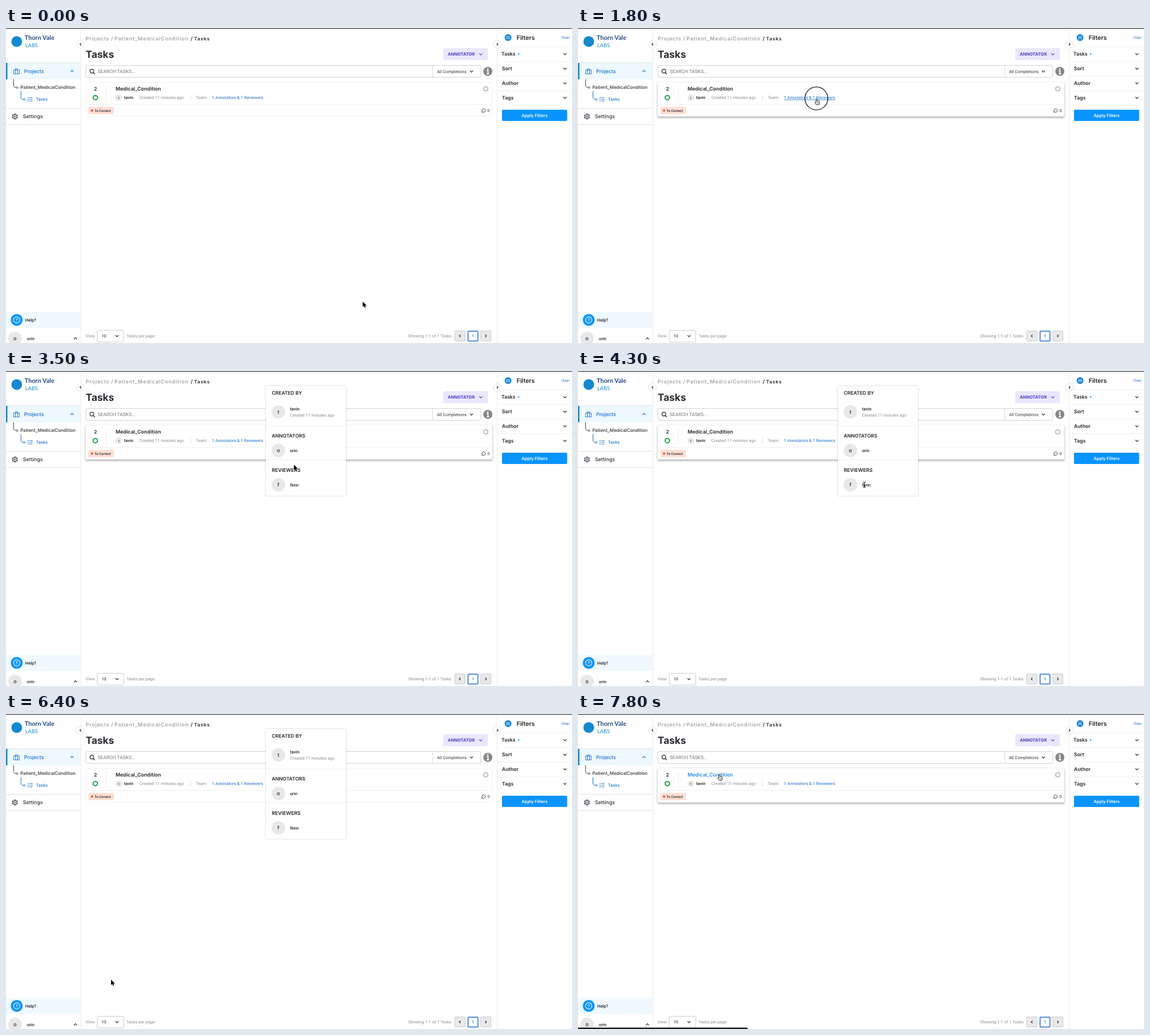
These frames come from a looping animation (1002 by 559 pixels, 8 s). An HTML page:

```html
<!DOCTYPE html>
<html lang="en">
<head>
<meta charset="utf-8">
<title>Task list</title>
<style>
  html, body { margin: 0; width: 100%; height: 100%; overflow: hidden; background: #fff; }
  svg { display: block; }
  text { text-rendering: geometricPrecision; white-space: pre; }
  .head { font-family: Inter, sans-serif; }
  .body { font-family: Roboto, sans-serif; }
  .logo { font-family: Lato, sans-serif; }
  #cardHover { filter: drop-shadow(0 2px 1.5px rgba(0, 0, 0, .32)); }
  #popup > rect { filter: drop-shadow(0 0 1.5px rgba(0, 0, 0, .22)); }
</style>
</head>
<body>
<svg id="stage" width="1002" height="559" viewBox="0 0 1002 559"></svg>
<script>
const BLUE = '#0a94ff', LINK = '#1a6fc9', INK = '#24242c', GREY = '#8c8c8c', RULE = '#ececec';

// Text is placed by the middle of its capitals.
const text = (x, y, str, size, weight = 400, fill = INK, cls = 'body', extra = '') =>
  `<text class="${cls}" x="${x}" y="${y + size * .36}" font-size="${size}" font-weight="${weight}" fill="${fill}" ${extra}>${str}</text>`;
const head = (x, y, str, size, weight = 600, fill = INK, extra = '') => text(x, y, str, size, weight, fill, 'head', extra);
const mid = 'text-anchor="middle"';
const rect = (x, y, w, h, fill, stroke = 'none', r = 0, extra = '') =>
  `<rect x="${x}" y="${y}" width="${w}" height="${h}" rx="${r}" fill="${fill}" stroke="${stroke}" ${extra}/>`;
const circle = (x, y, r, fill, stroke = 'none', width = 1) =>
  `<circle cx="${x}" cy="${y}" r="${r}" fill="${fill}" stroke="${stroke}" stroke-width="${width}"/>`;
const path = (d, stroke, width = 1, extra = '') =>
  `<path d="${d}" fill="none" stroke="${stroke}" stroke-width="${width}" ${extra}/>`;
const chevron = (x, y, angle = 0, color = INK, size = 2.7) =>
  path(`M${-size} ${-size / 2}L0 ${size / 2}L${size} ${-size / 2}`, color, 1.2, `transform="translate(${x} ${y}) rotate(${angle})"`);
const avatar = (x, y, r, letter, size) => circle(x, y, r, '#e8e8e8') + head(x, y, letter, size, 500, INK, mid);

const sidebar = () =>
  circle(19, 24, 9.5, '#1489d0') +
  text(33, 17.5, 'Thorn Vale', 11, 700, '#254a86', 'logo') +
  text(34, 30.5, 'LABS', 9.4, 400, '#1489d0', 'logo') +
  rect(0, 62, 132, 29, '#edf8ff') + rect(0, 62, 2.5, 29, '#1187c6') +
  path('M0 61.5H132M0 142.5H132M0 171.5H132', '#e2e2e2') +
  path('M13.5 74.5H23.5V81.5H13.5ZM16.5 81V72.5H20.5V81', LINK, .9) +
  head(32, 76.5, 'Projects', 9, 500, LINK) + chevron(117, 76.5, 180, LINK) +
  path('M13.5 91V102Q13.5 105.5 18 105.5', '#444') + circle(19.8, 105.8, 1.5, '#fff', '#444', .9) +
  head(25.5, 105, 'Patient_MedicalCondition', 8, 500, '#333') +
  path('M26.5 112V123Q26.5 126.5 31 126.5', LINK) + circle(32.5, 126.8, 1.5, '#fff', LINK, .9) +
  path('M41.5 123.5H47M41.5 126.5H47M41.5 129.5H47M38 123.3L39 124.2L40.3 122.5M38 126.3L39 127.2L40.3 125.5M38 129.3L39 130.2L40.3 128.5', LINK, .9) +
  head(53, 126.5, 'Tasks', 7.5, 500, LINK) +
  circle(15.8, 157, 3.8, '#fff', INK, 1.1) + circle(15.8, 157, 1.5, 'none', INK, .9) +
  path('M15.8 151.7V153.2M15.8 160.8V162.3M11.2 154.3L12.5 155.1M19.1 158.9L20.4 159.7M11.2 159.7L12.5 158.9M19.1 155.1L20.4 154.3', INK, 1.7) +
  head(30, 157, 'Settings', 9, 500, '#333') +
  rect(0, 504, 132, 28, '#eff9ff') +
  circle(19, 518, 10.5, BLUE) + circle(19, 518, 5.6, 'none', '#fff', 1.1) + text(19, 518, '?', 8, 500, '#fff', 'body', mid) +
  text(34, 518, 'Help?', 7.6, 500) +
  avatar(16, 551, 12, 'o', 9) + text(37, 551, 'orin', 7.7, 500) + chevron(123, 551, 180) +
  path('M132.5 1V559M869.5 1V559', RULE) +
  [[132, 90], [870, -90]].map(([x, a]) => circle(x, 29, 7, '#fff', '#e4e4e4') + chevron(x, 29, a, INK, 2.2)).join('');

const card = () =>
  rect(141.5, 96.5, 719, 60, '#fff', '#f1f1f1', 2) +
  `<g id="cardHover">${rect(141, 96, 720, 61, '#fff', '#e9e9e9', 2, 'stroke-width=".6"')}</g>` +
  path('M142 135.5H860', '#f0f0f0') + path('M177.5 103V131', '#ddd', 1, 'stroke-dasharray="1 1"') +
  head(158.5, 108, '2', 8.6, 600, INK, mid) + circle(158.2, 123.6, 3.9, '#fff', '#24a34e', 2.1) +
  head(194, 107.5, 'Medical_Condition', 9, 600, INK, 'id="title"') +
  avatar(199.7, 123.8, 5.7, 't', 5.5) + text(209, 123.5, 'tavin', 7.6, 500) +
  text(236, 123.5, 'Created 11 minutes ago', 7.44, 400, GREY) + path('M326.5 119V128', '#ddd') +
  text(336, 123.5, 'Team:', 7.44, 400, GREY) +
  text(364.5, 123.5, '1 Annotators &amp; 1 Reviewers', 7.44, 400, LINK, 'body', 'id="team"') +
  rect(845.9, 104.5, 7, 7, '#fff', '#888', 1.5) +
  rect(146, 140, 45, 13, '#ffdfd3', 'none', 2) + circle(152.3, 146.6, 2, '#e2552f') + text(156.8, 146.5, 'To Correct', 6.2, 500) +
  path('M842.5 149.5L842.8 147.5A3 3 0 1 1 844.4 149.2Z', INK, .9) + text(852.3, 146.5, '0', 7);

const main = () =>
  head(141, 18.5, 'Projects', 9, 500, '#959595', 'letter-spacing=".9"') +
  head(186, 18.5, '/', 9, 500, '#959595') +
  head(192, 18.5, 'Patient_MedicalCondition', 9, 500, '#959595', 'letter-spacing=".9"') +
  head(327, 18.5, '/', 9, 600) + head(333, 18.5, 'Tasks', 8.4, 600, INK, 'letter-spacing=".9"') +
  head(141, 46.5, 'Tasks', 17.5, 700, '#2a2a30') +
  rect(774, 36, 79, 21, '#eae7fd', 'none', 2) + head(782, 46.5, 'ANNOTATOR', 7.6, 700, '#4d3fc4') + chevron(840.5, 46.5, 0, '#4d3fc4') +
  rect(141.5, 66.5, 699, 21, '#fff', '#d2d2d2', 2) + path('M755.5 67V87', '#d8d8d8') +
  circle(152, 76.5, 3.3, 'none', INK, 1.2) + path('M154.5 79L157.2 81.7', INK, 1.4) +
  text(162.3, 77, 'SEARCH TASKS...', 8.5, 400, '#757575') +
  text(763, 77, 'All Completions', 7.44, 400, '#333') + chevron(824, 77) +
  circle(853, 77, 8, '#868686') + circle(853, 72.8, 1.4, '#fff') + path('M851 75.7H853.3V81.3M850.8 81.4H855.4', '#fff', 1.8) +
  card() +
  text(141, 546.5, 'View', 7.44, 400, GREY) + rect(161.5, 536.5, 47, 20.5, '#fff', '#ccc', 2) +
  text(169, 546.5, '10', 7.44) + chevron(196.5, 546.5) + text(213, 546.5, 'Tasks per page', 7.44, 400, GREY) +
  text(712, 546.5, 'Showing 1-1 of 1 Tasks', 7.44, 400, GREY) +
  [794.5, 840.5].map((x, i) => rect(x, 537.5, 18, 18, '#e9e9e9', '#ccc', 1) + chevron(x + 9, 546.5, i ? -90 : 90, INK, 2.2)).join('') +
  rect(818, 538, 17.5, 17.5, '#fff', '#2468d6', 1, 'stroke-width="1.5"') + text(826.8, 546.5, '1', 7.2, 500, '#2468d6', 'body', mid);

const filters = () =>
  circle(888.8, 17, 6, '#1283d8') +
  path('M886.5 14V20M888.8 14V20M891.1 14V20M885.6 18.2H887.4M887.9 15.8H889.7M890.2 18.2H892', '#fff', .7) +
  head(904, 17, 'Filters', 10.7, 600) + text(983, 17, 'Clear', 6.3, 400, '#2468d6') +
  path('M870 33.5H1002M870 59.5H1002M870 85.5H1002M870 111.5H1002', '#f0f0f0') +
  ['Tasks', 'Sort', 'Author', 'Tags'].map((s, i) =>
    head(i ? 878 : 877, 46.3 + i * 25.8, s, 8.8, 600) + chevron(989.5, 46.3 + i * 25.8)).join('') +
  circle(907.6, 46, 1.3, BLUE) +
  rect(878, 145, 115.5, 20, BLUE, 'none', 2) + head(935.8, 154.8, 'Apply Filters', 7.6, 600, '#fff', mid);

const popup = () =>
  rect(460, 26.5, 142, 195, '#fff', 'none', 2) + path('M460 97.5H602M460 157.5H602', '#f2f2f2') +
  head(470.5, 39, 'CREATED BY', 8.6, 600) + avatar(482.3, 72.5, 12, 't', 9) +
  text(502.7, 67.5, 'tavin', 7.8, 500) + text(502.7, 78, 'Created 11 minutes ago', 7.44, 400, GREY) +
  head(470.5, 114.5, 'ANNOTATORS', 8.6, 600) + avatar(482.3, 141, 12, 'o', 9) + text(502.7, 141, 'orin', 7.7, 500) +
  head(470.5, 175.5, 'REVIEWERS', 8.8, 600) + avatar(482.3, 202, 12, 'f', 9) + text(502.7, 202, 'fenn', 7.7, 500);

const outline = 'stroke="#fff" stroke-width=".9" paint-order="stroke" stroke-linejoin="round"';
const cursors = {
  arrow: `<path d="M0 0V9.6L2.2 7.6L3.8 11.1L5.4 10.4L3.9 7H7Z" ${outline}/>`,
  hand: '<path d="M-1 1Q0 -.6 1 1V4.2L4.3 5Q5.3 5.4 5 7L4.2 11H-.8L-3.2 7.2Q-3 6-1 7.2Z" fill="#fff" stroke="#111" stroke-width=".95"/>' + path('M1.2 6.3V8.8M2.9 6.5V8.8', '#111', .6),
  beam: path('M-2.5 -5Q0 -5 0 -3.5Q0 -5 2.5 -5M0 -4V4M-2.5 5Q0 5 0 3.5Q0 5 2.5 5M-1.5 1H1.5', '#111', 1)
};

const $ = id => document.getElementById(id);
$('stage').innerHTML = rect(0, 0, 1002, 1.2, '#333') + sidebar() + main() + filters() +
  `<g id="popup">${popup()}</g><g id="ring">${circle(422, 125, 20.3, 'none', '#111', 1.3)}</g>` +
  `<g id="status">${rect(-4, 556.5, 304.5, 10, '#1b1b1b', 'none', 2)}</g>` +
  `<g id="cursor">${Object.entries(cursors).map(([k, v]) => `<g id="${k}">${v}</g>`).join('')}</g>`;

// Pointer stops: time, x, y and how strongly the way there eases out.
const stops = [
  [0, 631.5, 485.5, 1], [700, 548, 350, 2], [800, 548, 350, 1], [1100, 461, 180.5, 1], [1700, 422.5, 125, 3],
  [2300, 422.5, 125, 1], [2700, 507, 141, 1.5], [3200, 511.5, 143, 2], [3300, 511.5, 143, 1], [4200, 507, 202, 2],
  [4300, 507, 202, 1], [5100, 68, 534, 1.6], [5600, 38, 548, 2], [6100, 47, 552, 2], [6200, 47, 552, 1],
  [6400, 186, 471.5, 1], [7100, 238, 170, 1.3], [7700, 250.5, 106.5, 2], [8000, 250.5, 106.5, 1]
];

function pointer(t) {
  const i = stops.findIndex(s => s[0] > t);
  const [t0, x0, y0] = stops[i - 1], [t1, x1, y1, power] = stops[i];
  const u = 1 - (1 - (t - t0) / (t1 - t0)) ** power;
  return [x0 + (x1 - x0) * u, y0 + (y1 - y0) * u];
}

const show = (id, on) => $(id).setAttribute('visibility', on ? 'visible' : 'hidden');

function draw() {
  const t = Math.floor(performance.now() % 8000 / 100) * 100;
  const [x, y] = pointer(t);
  const over = (left, top, right, bottom) => x > left && x < right && y > top && y < bottom;
  const open = t >= 1900 && t < 6800;
  const onTeam = over(364, 117, 455, 130), onTitle = over(194, 102, 276, 114);
  const onName = open && (over(501, 134, 519, 148) || over(501, 195, 519, 209));
  const kind = onName ? 'beam' : onTeam || onTitle || over(0, 532, 132, 559) ? 'hand' : 'arrow';

  show('popup', open);
  show('ring', t >= 1800 && t < 2000);
  show('status', t >= 7800);
  show('cardHover', over(141, 96, 861, 157) || open && over(460, 26, 602, 222));
  $('title').setAttribute('fill', onTitle ? '#2a8fe6' : INK);
  $('team').setAttribute('text-decoration', onTeam ? 'underline' : 'none');
  for (const k in cursors) show(k, k === kind);
  $('cursor').setAttribute('transform', `translate(${x} ${y})`);
  requestAnimationFrame(draw);
}
draw();
</script>
</body>
</html>
```
